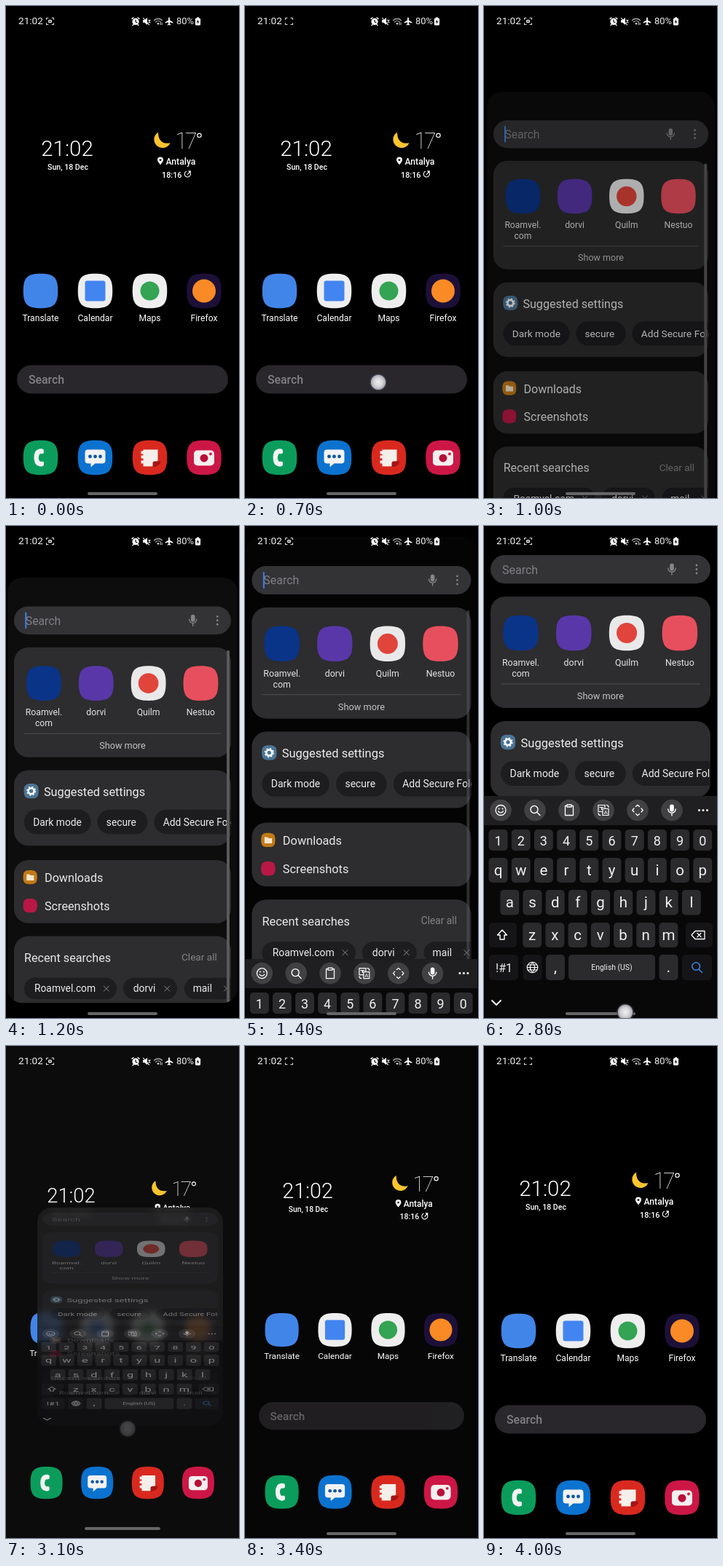
An HTML page for the animation above (4.1 s loop, 320 px wide and 676 px high).

```html
<!DOCTYPE html>
<html lang="en">
<head>
<meta charset="utf-8">
<title>Phone search</title>
<style>
html, body { margin: 0; width: 100%; height: 100%; overflow: hidden; background: #000; }
svg { display: block; width: 320px; height: 676px; font-family: Roboto, sans-serif; }
</style>
</head>
<body>
<svg id="stage" viewBox="0 0 320 676"></svg>
<script>
const LOOP = 4100, STEP = 100;
const stage = document.getElementById('stage');

// Drawing helpers
const rect = (x, y, w, h, r, fill, id = '') =>
  `<rect x="${x}" y="${y}" width="${w}" height="${h}" rx="${r}" fill="${fill}" ${id && `id="${id}"`}/>`;
const circle = (x, y, r, fill) => `<circle cx="${x}" cy="${y}" r="${r}" fill="${fill}"/>`;
const text = (s, x, y, size, fill = '#fff', weight = 400, anchor = 'start') =>
  `<text x="${x}" y="${y}" font-size="${size}" fill="${fill}" font-weight="${weight}" text-anchor="${anchor}">${s}</text>`;
const mid = (s, x, y, size, fill, weight) => text(s, x, y, size, fill, weight, 'middle');
const line = (d, color = '#fff', w = 1.5) =>
  `<path d="${d}" fill="none" stroke="${color}" stroke-width="${w}" stroke-linecap="round" stroke-linejoin="round"/>`;
const shape = (d, fill = '#fff') => `<path d="${d}" fill="${fill}"/>`;
const at = (x, y, body, s = 1) => `<g transform="translate(${x} ${y}) scale(${s})">${body}</g>`;
const group = (id, body) => `<g id="${id}">${body}</g>`;
const tile = (x, y, size, fill) => at(x, y,
  shape('M-1 0C-1-.77-.77-1 0-1S1-.77 1 0 .77 1 0 1-1 .77-1 0', fill), size / 2);
const mic = (color, w) =>
  rect(-2.8, -8, 5.6, 10, 2.8, color) + line('M-5.2-1.5a5.2 5.2 0 0 0 10.4 0M0 4v3.5', color, w);

function statusBar() {
  return text('21:02', 17, 25.3, 13.6, '#f2f2f2') +
    at(60.5, 21, line('M-5-2.5V-4.5H-2.5M2.5-4.5H5V-2.5M5 2.5V4.5H2.5M-2.5 4.5H-5V2.5', '#d8d8d8', 1.1) +
      group('rec', rect(-2.5, -2.3, 5, 4.6, 1.5, '#d8d8d8') + circle(0, 0, 1, '#333'))) +
    at(178, 21, circle(0, .4, 4.6, '#fff') + line('M-5-3.4l2-1.6M5-3.4l-2-1.6M-3 4.4l-1 1M3 4.4l1 1', '#fff', 1.4) +
      line('M0-2V.7L2 1.8', '#000', 1.1)) +
    at(193, 21, shape('M-5-1.8H-2.6L1-5V5L-2.6 1.8H-5z') + line('M2.8-1.8L5 1.8M5-1.8L2.8 1.8M-4.5-4.5L3.5 4.8', '#fff', 1.1)) +
    at(209, 21, line('M-5.5-1.3a8 8 0 0 1 11 0M-3.4 1a5 5 0 0 1 6.8 0', '#aaa', 1.3) + circle(0, 3.2, 1.3, '#ddd') +
      line('M3.2 4.8V2M5.2 2V4.8', '#ddd', .9)) +
    at(224, 21, shape('M-.9-4.6Q0-6.4.9-4.6V-1.5L5.4 1.3V2.6L.9 1.2V3.6L2.4 4.7V5.6L0 5-2.4 5.6V4.7L-.9 3.6V1.2L-5.4 2.6V1.3L-.9-1.5z')) +
    text('80%', 234, 25.3, 13, '#f2f2f2') +
    at(263.5, 21, rect(-3.6, -4.2, 7.2, 9.6, 1.5, '#fff') + rect(-1.6, -5.5, 3.2, 2, .5, '#fff') +
      shape('M.6-2.4L-2 1.2H-.2L-.6 3.8 2 .2H.2z', '#111'));
}

function homeScreen() {
  const xs = [47.5, 122.5, 197.5, 272], y = 391.5;
  const apps = [
    ['Translate', '#4285e8', ''],
    ['Calendar', '#eeeeef', rect(-14, -14, 28, 28, 3, '#4285f0')],
    ['Maps', '#eeeeef', circle(0, 0, 13, '#34a353')],
    ['Firefox', '#1d1038', circle(0, 0, 16, '#f98a25')]
  ];
  const dock = [
    ['#0b9c5c', shape('M-1.5-12Q-9-11-9 0T-1.5 12Q3 13 4.4 10.5V6.3Q3.5 4.6-.5 5.4-2.8 3.6-2.8 0T-.5-5.4Q3.5-4.6 4.4-6.3V-10.5Q3-13-1.5-12z', '#f2f4f2')],
    ['#0c72cf', shape('M-10-11H10Q14-11 14-7V4Q14 8 10 8H0L-6 13V8H-10Q-14 8-14 4V-7Q-14-11-10-11z', '#f2f2f2') +
      [-7, 0, 7].map(x => circle(x, -1.5, 2.4, '#0b56a8')).join('')],
    ['#d9291f', shape('M-9-11H11V4L4 12H-9V8H-12V4H-9V1H-12V-3H-9V-5H-12V-9H-9z', '#f4efea') +
      shape('M4 13V8Q4 5 7 5H15Q14 12 4 13z', '#a51517')],
    ['#cc1746', rect(-14, -10, 28, 21, 5, '#f4efef') + circle(0, .7, 5.5, '#b71038') + circle(9, -5, 2, '#d01d3f')]
  ];
  return mid('21:02', 84, 205.8, 29.5, '#fff', 300) +
    mid('Sun, 18 Dec', 85, 225, 10.6, '#fff', 500) +
    at(214, 183, shape('M-5-9.6C-5 2 1 7 11.5 5.2A11.6 11.6 0 1 1-5-9.6z', '#fcc42f')) +
    `<g letter-spacing="-3.2">${text('17', 232.5, 196.3, 30.5, '#fff', 200)}</g>` +
    '<circle cx="265.5" cy="177.8" r="2.7" fill="none" stroke="#fff" stroke-width="1.2"/>' +
    at(212, 213, shape('M0 5.2C-2.6 2-4-.1-4-1.6a4 4 0 0 1 8 0C4-.1 2.6 2 0 5.2z') + circle(0, -1.4, 1.4, '#000')) +
    text('Antalya', 219.5, 217.7, 12.2, '#fff', 500) +
    text('18:16', 214, 235.7, 10.8, '#fff', 500) +
    at(249.3, 231, line('M2.2-3.5A4.1 4.1 0 1 1-1.8-3.7M0 .5L3.8-4.2M1.5-4.3H4V-1.9', '#fff', 1.1)) +
    apps.map(([name, bg, mark], i) =>
      tile(xs[i], y, 47.5, bg) + at(xs[i], y, mark) + mid(name, xs[i], 433, 12.1)).join('') +
    group('homeSearch', rect(15, 493.5, 290, 39, 19.5, '#29272b') + text('Search', 31, 518.6, 15.8, '#828184', 500)) +
    dock.map(([bg, glyph], i) => tile(xs[i], 620.5, 47.5, bg) + at(xs[i], 620.5, glyph)).join('');
}

function panel() {
  const card = (y, h) => rect(9, y, 302, h, 20, '#2d2c2e');
  const chip = (x, w, y, h, s, tx, ty) => rect(x, y, w, h, h / 2, '#1d1d1f') + text(s, tx, ty, 14, '#ececec');
  const cross = x => line(`M${x - 3.5} 568.5l7 7m0-7l-7 7`, '#8a8a8a', 1);
  const apps = [['Roamvel.', '#0a3488'], ['dorvi', '#5937a8'], ['Quilm', '#e9e9ea', '#e0443a'], ['Nestuo', '#e84f5e']];
  return rect(9, 40, 302, 39, 19.5, '#333235') + text('Search', 25, 65.6, 16, '#818084') +
    rect(24.5, 48, 2, 23, 1, '#3d83ea', 'cursor') +
    at(258, 59.5, mic('#858487', 1.4)) + [54, 59.5, 65].map(y => circle(292, y, 1.4, '#858487')).join('') +
    card(97, 153) +
    apps.map(([name, bg, mark], i) => {
      const x = 50.5 + 72.8 * i;
      return tile(x, 147, 48.5, bg) + (mark ? circle(x, 147, 14, mark) : '') + mid(name, x, 192, 12.4, '#e4e4e4');
    }).join('') +
    mid('com', 50.5, 207, 12.4, '#e4e4e4') + rect(23, 216.5, 274, 1, 0, '#505052') +
    mid('Show more', 160, 238, 12.8, '#c4c4c5') +
    card(268, 105) + tile(33, 297, 20.5, '#4c7595') +
    '<circle cx="33" cy="297" r="4" fill="none" stroke="#fff" stroke-width="2.6"/>' +
    '<circle cx="33" cy="297" r="5.8" fill="none" stroke="#fff" stroke-width="1.6" stroke-dasharray="2.3 2.25"/>' +
    text('Suggested settings', 50.5, 303.8, 16.5, '#ededed') +
    '<g clip-path="url(#cardClip)">' +
    chip(23, 93, 323, 34, 'Dark mode', 35.5, 345) + chip(125, 70, 323, 34, 'secure', 137.5, 345) +
    chip(204, 150, 323, 34, 'Add Secure Folder', 216.5, 345) + '</g>' +
    card(393, 88) + tile(31.5, 417, 19.5, '#c27a16') + shape('M26.5 413h4l1.3 1.5h5v7h-10.3z', '#f3e6d0') +
    text('Downloads', 51.6, 423.6, 16.4, '#e8e8e8') +
    tile(31.5, 456.5, 19.5, '#b81845') + text('Screenshots', 51.6, 462.6, 16.4, '#e8e8e8') +
    card(499, 120) + text('Recent searches', 23.2, 534.5, 16.4, '#e8e8e8') +
    text('Clear all', 291.5, 533.2, 13.8, '#858585', 400, 'end') +
    '<g clip-path="url(#cardClip)">' +
    chip(23, 129, 557, 30, 'Roamvel.com', 37.4, 577) + cross(137.5) +
    chip(161, 75, 557, 30, 'dorvi', 175, 577) + cross(222) +
    chip(246, 80, 557, 30, 'mail', 258, 577) + cross(305) + '</g>' +
    rect(305, 101, 4, 491, 2, '#5b5b5c', 'scroll');
}

function keyboard() {
  const light = '#2b2b2d', dark = '#151517', gap = 31.2;
  const key = (x, y, w, h, fill) => rect(x, y, w, h, 5, fill);
  const row = (chars, x0, y, h, size, base) => [...chars].map((c, i) =>
    key(x0 + gap * i - 13, y, 26, h, light) + mid(c, x0 + gap * i, base, size, '#f0f0f0')).join('');
  const tools = [
    '<circle r="7" fill="none" stroke="#fff" stroke-width="1.3"/>' + circle(-2.5, -2, 1, '#fff') + circle(2.5, -2, 1, '#fff') +
      line('M-3.5 1.5Q0 5.5 3.5 1.5', '#fff', 1.2),
    line('M3.2 3.2L7 7M4-1a5 5 0 1 1-10 0 5 5 0 0 1 10 0', '#fff', 1.4),
    line('M-3-6H-5.5V7H5.5V-6H3M-3-7.5H3V-4.5H-3z', '#fff', 1.3),
    line('M-1 2H-7V-7H2V-3M-1-2H7V7H-1zM4-7Q7-7 7-4M-4 7Q-7 7-7 4M-5-4H0M-2.5-4V-1', '#fff', 1.2) + mid('A', 3, 5.2, 8),
    line('M-2.5-5L0-7.2 2.5-5M-2.5 5L0 7.2 2.5 5M-5-2.5L-7.2 0-5 2.5M5-2.5L7.2 0 5 2.5', '#fff', 1.3),
    mic('#fff', 1.4)
  ];
  return rect(0, 371, 320, 306, 0, '#080809') + rect(0, 371, 320, 40, 0, '#1f1f21') +
    tools.map((icon, i) => at(23 + 47 * i, 390.5, circle(0, 0, 14.8, '#414143') + icon)).join('') +
    [295.5, 301, 306.5].map(x => circle(x, 390.5, 1.5, '#fff')).join('') +
    row('1234567890', 19.5, 417, 29, 18, 438.5) +
    row('qwertyuiop', 19.5, 456, 34, 20.5, 480) +
    row('asdfghjkl', 35.3, 500, 34.5, 20.5, 524) +
    row('zxcvbnm', 66.2, 545, 34, 20.5, 569) +
    key(7, 545, 38, 34, dark) + line('M25 555l-6.5 7h3.5v6h6v-6h3.5z', '#fff', 1.4) +
    key(277, 545, 37, 34, dark) + line('M285 562l5-5.5h13v11h-13zM293 559.5l5 5m0-5l-5 5', '#fff', 1.3) +
    key(7, 589, 40, 35, dark) + mid('!#1', 27.5, 612.5, 16, '#f0f0f0') +
    key(53.5, 589, 26, 35, dark) +
    at(66.5, 606.5, line('M-7.3 0a7.3 7.3 0 1 1 14.6 0a7.3 7.3 0 1 1-14.6 0M-7 0H7M0-7Q-6.5 0 0 7Q6.5 0 0-7M-6-3.5H6M-6 3.5H6', '#fff', 1.1)) +
    key(85, 589, 26, 35, light) + mid(',', 98, 613, 20) +
    key(116, 589, 119, 35, light) + mid('English (US)', 175.5, 610.2, 10.4, '#f0f0f0') +
    key(240.5, 589, 26, 35, light) + mid('.', 253.5, 613, 20) +
    key(272, 589, 41, 35, dark) +
    at(292.5, 606.5, line('M2.8 2.8L7 7M4-1.5a5.3 5.3 0 1 1-10.6 0 5.3 5.3 0 0 1 10.6 0', '#3e82e8', 1.6)) +
    line('M11 652l6 6 6-6', '#fff', 1.8);
}

stage.innerHTML = `<defs>
  <clipPath id="winClip"><rect id="winShape" width="320"/></clipPath>
  <clipPath id="hazeClip"><rect id="hazeShape" rx="18"/></clipPath>
  <clipPath id="cardClip"><rect x="9" width="302" height="700"/></clipPath>
  <filter id="blur"><feGaussianBlur stdDeviation="5"/></filter>
  <radialGradient id="dot"><stop offset="0" stop-color="#f0f0f2"/><stop offset=".5" stop-color="#d2d2d6"/>
  <stop offset=".78" stop-color="#a9aab2"/><stop offset=".84" stop-color="#4a4b5c"/><stop offset="1" stop-color="#333444" stop-opacity="0"/></radialGradient>
  </defs>` +
  rect(0, 0, 320, 676, 0, '#000', 'wall') + group('home', homeScreen()) +
  `<g id="haze" clip-path="url(#hazeClip)">${rect(0, 0, 320, 676, 0, '#0c0b0e')}<use href="#home" filter="url(#blur)"/></g>` +
  `<g id="win" clip-path="url(#winClip)">${rect(0, 0, 320, 676, 0, '#000', 'winBack')}${group('panel', panel())}${group('keys', keyboard())}</g>` +
  group('status', statusBar()) + rect(-48, -2, 96, 4, 2, '#666668', 'handle') +
  '<circle id="touch" r="12.5" fill="url(#dot)"/>';

const el = Object.fromEntries([...stage.querySelectorAll('[id]')].map(e => [e.id, e]));

// Tracks of [time, value, ...]
const box = [
  [800, 6, 190, 308, 651], [900, 5, 150, 311, 656], [1000, 4, 118, 313, 660], [1100, 3, 92, 314.5, 664],
  [1200, 2.1, 71, 315.8, 667.2], [1300, 1, 38, 318, 672], [1400, .4, 15, 319, 675], [1500, 0, 0, 320, 676],
  [2800, 0, 0, 320, 676], [2900, 12, 90, 297, 540], [3000, 28, 165, 275, 410],
  [3100, 43, 222, 255, 300], [3200, 60, 300, 215, 190], [3300, 75, 370, 180, 110]];
const winAlpha = [[700, 0], [1100, 1], [2800, 1], [3100, .85], [3200, .45], [3300, .15], [3400, 0]];
const winGray = [[1200, 13], [1500, 0], [2800, 0], [3100, 32]];
const panelAlpha = [[2800, 1], [3100, .5]];
const panelStretch = [[2800, 0, 1], [3100, -26, 1.047]];
const keysAlpha = [[2800, 1], [3100, .55]];
const keysDrop = [[1300, 305], [1400, 210], [1500, 110], [1600, 45], [1700, 12], [1800, 0]];
const scrollAlpha = [[1200, 1], [1600, 0]];
const hazeAlpha = [[3100, 1], [3400, 0]];
const homeAlpha = [[700, 1], [1000, 0], [2800, 0], [3000, 1]];
const homeScale = [[2800, .91], [3100, .928], [3300, .96], [3500, .985], [3900, 1]];
const homeSearchAlpha = [[3100, 0], [3500, 1]];
const wallGray = [[2800, 0], [2900, 12], [3200, 12], [3600, 0]];
const handleLift = [[2800, 0], [3000, 1], [3100, 1], [3400, 0]];
const touch = [[700, 183, 517, 1], [900, 183, 517, 0], [2600, 194, 670, 1], [2800, 194, 668, 1],
  [2900, 187, 624, .8], [3000, 176, 570, .5], [3100, 167, 526, .26], [3200, 163, 510, 0]];
const recOn = [[0, 300], [900, 1700], [2600, 3400]];

function sample(track, t) {
  const n = track.findIndex(k => k[0] > t);
  if (n === 0) return track[0].slice(1);
  if (n < 0) return track[track.length - 1].slice(1);
  const a = track[n - 1], b = track[n], p = (t - a[0]) / (b[0] - a[0]);
  return a.slice(1).map((v, i) => v + (b[i + 1] - v) * p);
}
const value = (track, t) => sample(track, t)[0];
const set = (e, attrs) => { for (const k in attrs) e.setAttribute(k, attrs[k]); };
const gray = v => `rgb(${v},${v},${v})`;

function draw(t) {
  const closing = t >= 2800;
  const [x, y, width, height] = sample(box, t);
  const sx = width / 320, sy = height / 676;
  const r = t < 1500 || t > 2800 ? 20 : 0;
  set(el.win, { transform: `translate(${x} ${y}) scale(${sx} ${sy})`, opacity: value(winAlpha, t) });
  set(el.winShape, { height: t < 1300 ? 592 : 676, rx: r / sx, ry: r / sy });
  set(el.winBack, { fill: gray(value(winGray, t)) });
  const [shift, stretch] = sample(panelStretch, t);
  set(el.panel, { transform: `translate(0 ${shift / sy}) scale(1 ${stretch})`, opacity: value(panelAlpha, t) });
  if (closing) set(el.panel, { transform: `translate(0 ${shift}) scale(1 ${stretch})` });
  set(el.keys, { transform: `translate(0 ${value(keysDrop, t)})`, opacity: value(keysAlpha, t) });
  set(el.scroll, { opacity: value(scrollAlpha, t) });
  set(el.cursor, { opacity: t >= 1000 && t < 2100 ? 1 : 0 });

  const s = closing ? value(homeScale, t) : 1;
  set(el.home, { transform: `translate(160 338) scale(${s}) translate(-160 -338)`, opacity: value(homeAlpha, t) });
  set(el.homeSearch, { opacity: closing ? value(homeSearchAlpha, t) : 1 });
  set(el.haze, { opacity: t > 2800 ? value(hazeAlpha, t) : 0 });
  set(el.hazeShape, { x, y, width, height });
  set(el.wall, { fill: gray(value(wallGray, t)) });

  const lift = value(handleLift, t);
  set(el.handle, { transform: `translate(160 ${670 - 7 * lift}) scale(${1 + .083 * lift} 1)` });
  const [tx, ty, alpha] = sample(touch, t);
  const touching = t >= 700 && t < 900 || t >= 2600;
  set(el.touch, { cx: tx, cy: ty, opacity: touching ? alpha : 0 });
  set(el.rec, { opacity: recOn.some(([a, b]) => t >= a && t < b) ? 1 : 0 });
}

const start = performance.now();
function tick() {
  const t = (performance.now() - start) % LOOP;
  draw(Math.floor(t / STEP) * STEP);
  requestAnimationFrame(tick);
}
tick();
</script>
</body>
</html>
```
